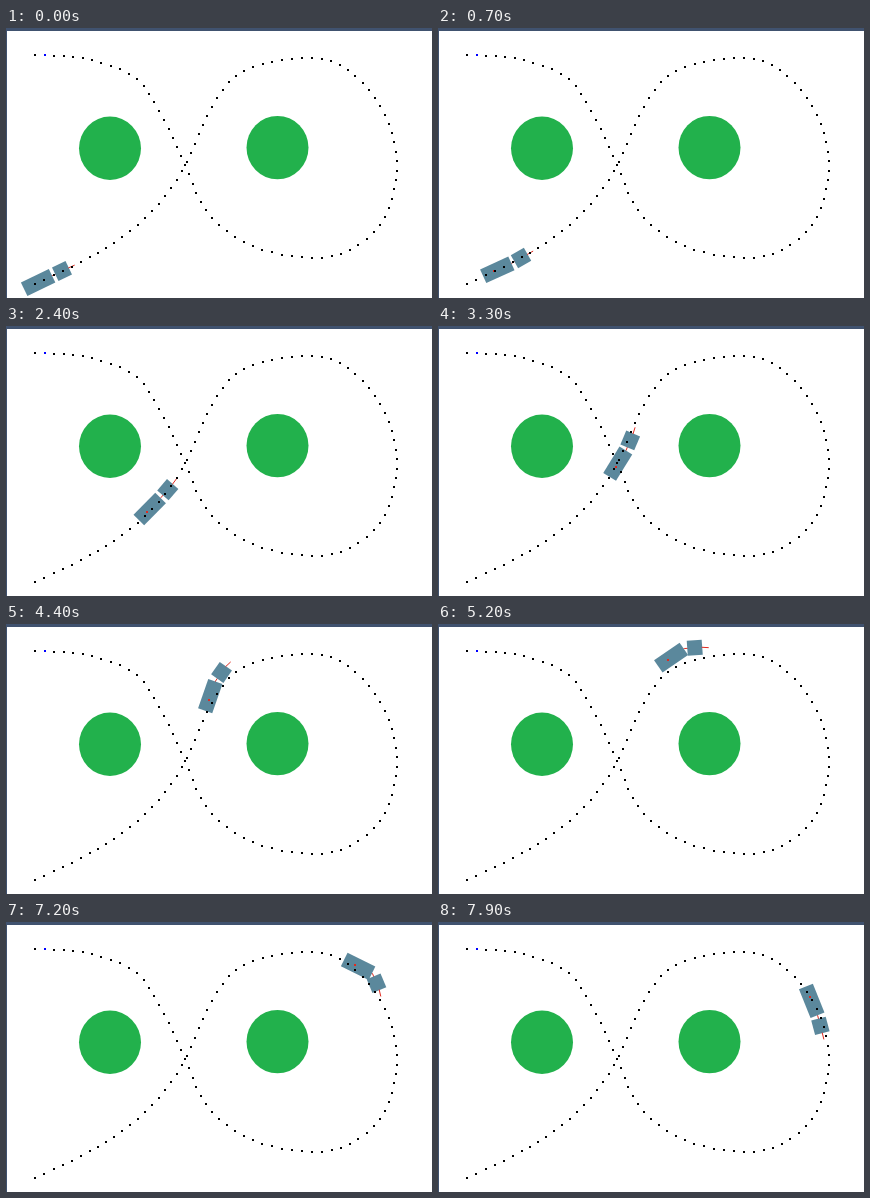
Animation, 426 px wide and 270 px high, one loop 8000 ms. Source, as an HTML page with a canvas:

```html
<!DOCTYPE html>
<html>
<head>
<meta charset="utf-8">
<style>
html, body { margin: 0; width: 100%; height: 100%; overflow: hidden; background: #fff; }
canvas { display: block; }
</style>
</head>
<body>
<canvas id="stage" width="426" height="270"></canvas>
<script>
const ctx = document.getElementById('stage').getContext('2d');
const LOOP = 8000, FRAME = 100, SUBSTEP = 20;
const LEG = 700;          // ms between the driven points
const DOTS_PER_LEG = 5;
const HITCH = 10.5;       // tractor centre to hitch
const DRAWBAR = 20;       // hitch to trailer axle
const AXLE = 4;           // trailer centre to its axle
const LOOK_AHEAD = 250;
const BODY = '#5b889c', RED = '#e02a20';

// Key points of the planned track, evenly spaced in dots
const track = [
  [29, 256], [75, 234], [116, 209], [153, 176], [181, 134], [201, 88],
  [230, 48], [276, 32], [325, 33], [363, 62], [386, 105], [390, 152],
  [374, 197], [335, 226], [286, 228], [238, 214], [200, 182], [179, 137],
  [158, 92], [131, 51], [86, 32], [39, 27]
];

// Points the tractor really passes, evenly spaced in time
const drive = [
  [56, 243], [83, 230], [119, 207.5], [149, 178], [177.5, 143], [197, 102.5],
  [209, 59], [238, 28], [284, 24.5], [326, 36], [364.5, 51.5], [379, 92], [390, 134]
];

// Smooth curve through evenly spaced points; u counts points
function spline(pts, u) {
  const last = pts.length - 1;
  const i = Math.min(Math.floor(u), last - 1), f = u - i;
  const slope = (j, k) => {
    const lo = Math.max(j - 1, 0), hi = Math.min(j + 1, last);
    return (pts[hi][k] - pts[lo][k]) / (hi - lo);
  };
  return [0, 1].map(k => {
    const a = pts[i][k], d = pts[i + 1][k] - a;
    const m0 = slope(i, k), m1 = slope(i + 1, k);
    return a + f * (m0 + f * (3 * d - 2 * m0 - m1 + f * (m0 + m1 - 2 * d)));
  });
}

const angleTo = (a, b) => Math.atan2(b[1] - a[1], b[0] - a[0]);
const ahead = ([x, y], angle, d) => [x + d * Math.cos(angle), y + d * Math.sin(angle)];
const tractorAt = t => spline(drive, t / LEG);
const headingAt = t => angleTo(tractorAt(t), tractorAt(t + 1));
const hitchAt = t => ahead(tractorAt(t), headingAt(t), -HITCH);

// The trailer axle is dragged behind the hitch at a fixed distance
const axles = [];
let axle = ahead(hitchAt(0), headingAt(0), -DRAWBAR);
for (let t = 0; t < LOOP; t += SUBSTEP) {
  const hitch = hitchAt(t);
  axle = ahead(hitch, angleTo(axle, hitch), -DRAWBAR);
  if (t % FRAME === 0) axles.push(axle);
}

const dots = Array.from({ length: (track.length - 1) * DOTS_PER_LEG + 1 },
  (_, i) => spline(track, i / DOTS_PER_LEG));
const goal = dots.length - 1;
dots.push([29, 27]);

function disc(x, y) {
  ctx.fillStyle = '#22b14c';
  ctx.beginPath();
  ctx.ellipse(x, y, 31, 31.7, 0, 0, 7);
  ctx.fill();
}

function box([x, y], angle, w, h) {
  ctx.save();
  ctx.translate(x, y);
  ctx.rotate(angle);
  ctx.fillStyle = BODY;
  ctx.fillRect(-w / 2, -h / 2, w, h);
  ctx.restore();
}

function line(a, b) {
  ctx.strokeStyle = RED;
  ctx.lineWidth = 1;
  ctx.beginPath();
  ctx.moveTo(...a);
  ctx.lineTo(...b);
  ctx.stroke();
}

function square([x, y], colour) {
  ctx.fillStyle = colour;
  ctx.fillRect(Math.round(x) - 1, Math.round(y) - 1, 2, 2);
}

function vehicle(frame) {
  const t = frame * FRAME;
  const tractor = tractorAt(t), heading = headingAt(t);
  const hitch = hitchAt(t), axle = axles[frame];
  const tail = angleTo(axle, hitch);
  const front = ahead(tractor, heading, 7);
  line(axle, hitch);
  line(hitch, tractor);
  box(ahead(axle, tail, AXLE), tail, 31, 15);
  box(tractor, heading, 15, 15);
  line(front, ahead(front, headingAt(t + LOOK_AHEAD), 7));
  square(axle, RED);
}

function draw(frame) {
  ctx.fillStyle = '#fff';
  ctx.fillRect(0, 0, 426, 270);
  disc(104, 120.3);
  disc(271.5, 119.6);
  vehicle(frame);
  dots.forEach((dot, i) => square(dot, i === goal ? '#00f' : '#000'));
  ctx.fillStyle = '#40526f';
  ctx.fillRect(0, 0, 426, 3);
  ctx.fillRect(0, 0, 1, 270);
}

const start = performance.now();
function tick() {
  const t = (performance.now() - start) % LOOP;
  draw(Math.floor(t / FRAME));
  requestAnimationFrame(tick);
}
tick();
</script>
</body>
</html>
```
